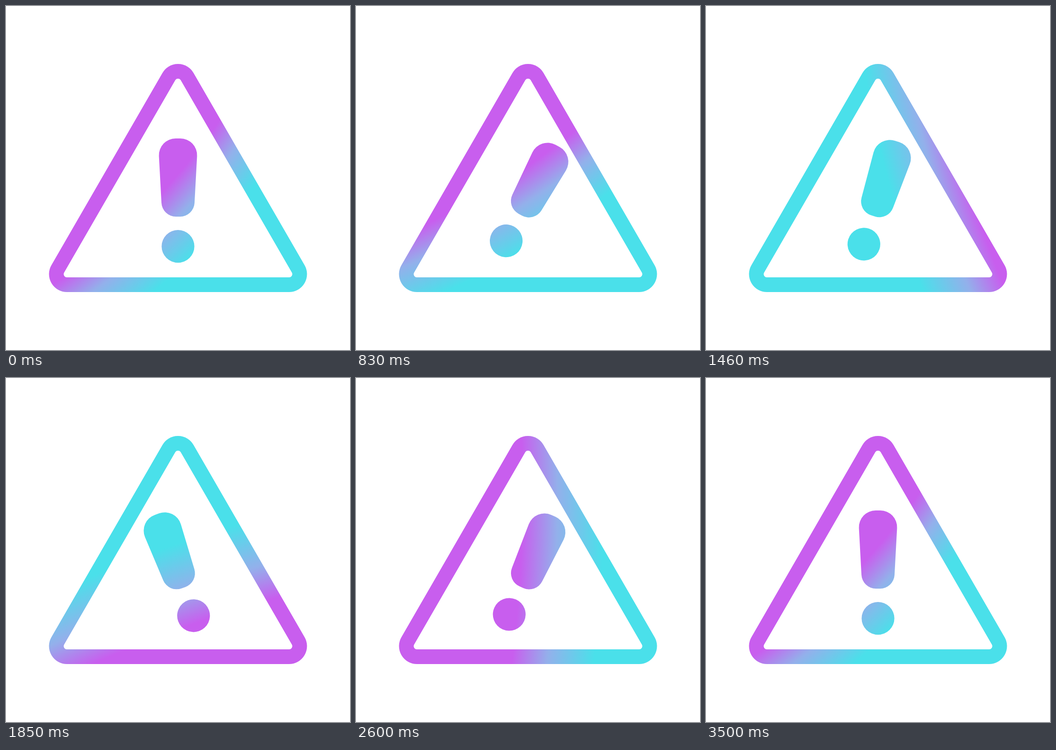
An HTML page for the animation above (3.53 s loop, 748x748 px).

```html
<!DOCTYPE html>
<html lang="en">
<head>
<meta charset="utf-8">
<title>Warning sign</title>
<style>
  html, body { margin: 0; width: 100%; height: 100%; overflow: hidden; background: #fff; }
  svg { display: block; width: 100vw; height: 100vh; }
</style>
</head>
<body>
<svg viewBox="0 0 748 748">
  <defs>
    <radialGradient id="tint" gradientUnits="userSpaceOnUse">
      <stop stop-color="#c85eee"/>
      <stop stop-color="#93b0eb"/>
      <stop stop-color="#4ae0ea"/>
    </radialGradient>
    <mask id="sign" maskUnits="userSpaceOnUse" x="0" y="0" width="748" height="748">
      <path fill="none" stroke="#fff" stroke-width="32"
        d="M354.1 153.5A23 23 0 0 1 393.9 153.5L635.4 571.5A23 23 0 0 1 615.5 606H132.5A23 23 0 0 1 112.6 571.5Z"/>
      <g id="mark" fill="#fff">
        <path d="M369 288H379A36.5 36.5 0 0 1 415.45 326.3L409.96 428A31.5 31.5 0 0 1 378.5 458H369.5A31.5 31.5 0 0 1 338.04 428L332.55 326.3A36.5 36.5 0 0 1 369 288Z"/>
        <circle cx="374" cy="522.7" r="35.6"/>
      </g>
    </mask>
  </defs>
  <rect width="748" height="748" fill="url(#tint)" mask="url(#sign)"/>
</svg>
<script>
const LOOP = 3530, START = 500, MOVE = 3000, STEP = 30, MID = 374;
const TILT = 30;
const swings = [500, 884, 1228, 1554, 1955, 2355, 3220]; // turning points of the shake, ms
const tint = document.getElementById('tint');
const mark = document.getElementById('mark');
const stops = tint.children;

const radians = deg => deg * Math.PI / 180;
const smooth = u => u * u * (3 - 2 * u);

// Cubic Bezier easing with handles (x1, 0) and (x2, 1)
function ease(x, x1, x2) {
  let lo = 0, hi = 1;
  for (let i = 0; i < 30; i++) {
    const u = (lo + hi) / 2, v = 1 - u;
    if (3 * u * v * (v * x1 + u * x2) + u ** 3 < x) lo = u;
    else hi = u;
  }
  return smooth(lo);
}

// A large radial gradient circles the sign once; its edge flattens on the way
function drawTint(p) {
  const angle = radians(41 + 360 * ease(p, 0.32, 0.42));
  const bulge = Math.sin(Math.PI * p ** 1.3);
  const dist = 1322 + 1800 * bulge;
  const width = 145 + 35 * bulge;
  const middle = dist - 20 + 96.5 * Math.cos(angle - radians(15.6));
  const r = middle + width / 2, band = width / r;
  tint.setAttribute('cx', MID - dist * Math.cos(angle));
  tint.setAttribute('cy', MID - dist * Math.sin(angle));
  tint.setAttribute('r', r);
  [0, 0.43, 1].forEach((f, i) => stops[i].setAttribute('offset', 1 - band * (1 - f)));
}

function tilt(t) {
  const last = swings.length - 1;
  if (t >= swings[last]) return 0;
  const pose = i => i === 0 || i === last ? 0 : i % 2 ? TILT : -TILT;
  const i = swings.findIndex(s => s > t) - 1;
  const u = (t - swings[i]) / (swings[i + 1] - swings[i]);
  return pose(i) + (pose(i + 1) - pose(i)) * smooth(u);
}

function draw(ms) {
  const t = START + Math.max(0, Math.floor((ms - START) / STEP)) * STEP;
  drawTint((t - START) / MOVE);
  mark.setAttribute('transform', `rotate(${tilt(t)} 374 423)`);
}

const begin = performance.now();
function tick() {
  draw((performance.now() - begin) % LOOP);
  requestAnimationFrame(tick);
}
tick();
</script>
</body>
</html>
```
